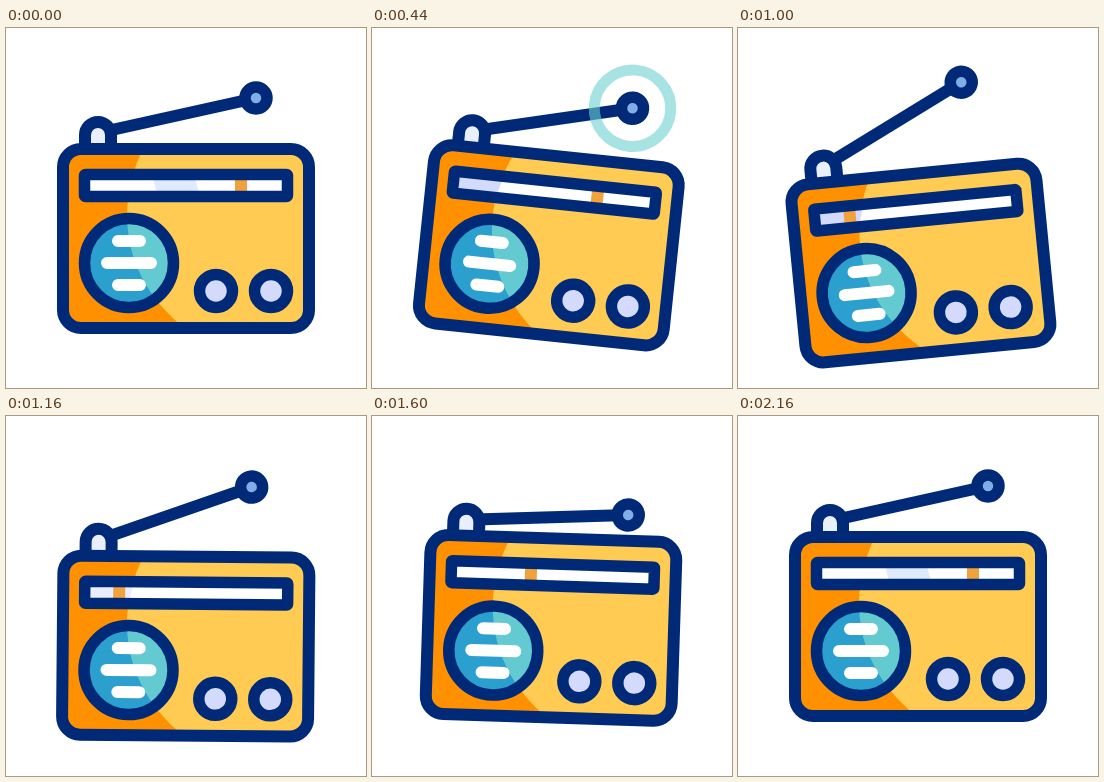
Write an HTML page that moves like this. It is 360 px wide and 360 px high and loops after 2.2 s.

```html
<!DOCTYPE html>
<html lang="en">
<head>
<meta charset="utf-8">
<title>Radio</title>
<style>
  html, body { margin: 0; width: 100%; height: 100%; overflow: hidden; background: #fff; }
  svg { display: block; width: 100%; height: 100%; }
  .line { fill: none; stroke: #002a78; stroke-width: 11.5; }
  .thick { stroke-width: 12; }
</style>
</head>
<body>
<svg viewBox="0 0 360 360">
  <defs>
    <path id="shade" d="M137 121C110 175 113 250 181 302H40V121Z"/>
    <clipPath id="caseClip"><rect x="57" y="121" width="246" height="179" rx="18"/></clipPath>
    <clipPath id="speakerClip"><circle cx="123" cy="235" r="44.5"/></clipPath>
  </defs>
  <g id="radio">
    <g id="antenna">
      <path class="line thick" d="M92 105L250 70"/>
      <circle class="line" cx="250" cy="70" r="11" style="fill:#82aee8"/>
      <circle id="wave" cx="250" cy="70" fill="none" stroke="#6fd0d2" stroke-width="11"/>
    </g>
    <path class="line thick" d="M79 121V107a13 13 0 0 1 26 0V121" style="fill:#e9effd"/>

    <g clip-path="url(#caseClip)">
      <rect x="57" y="121" width="246" height="179" fill="#ffcb52"/>
      <use href="#shade" fill="#ff9100"/>
    </g>
    <rect class="line thick" x="57" y="121" width="246" height="179" rx="18"/>

    <rect x="80" y="148" width="200" height="19" fill="#fff"/>
    <path id="dialShade" d="M84 150H127L123 165H84Z" fill="#d3dafb"/>
    <path id="dialGlow" d="M147 150H189L193 165H151Z" fill="#dfeafb"/>
    <rect id="needle" x="-6" y="151" width="12" height="13" fill="#f2a23a"/>
    <rect class="line" x="78.5" y="146.5" width="203" height="22" rx="1"/>

    <g clip-path="url(#speakerClip)">
      <rect x="70" y="180" width="110" height="110" fill="#64cad1"/>
      <use href="#shade" fill="#2b9fcd"/>
    </g>
    <circle class="line" cx="123" cy="235" r="44.5"/>
    <path id="grille" stroke="#fff" stroke-width="12" stroke-linecap="round"/>

    <circle class="line" cx="210" cy="263" r="16.5" style="fill:#d3dafb"/>
    <circle class="line" cx="265" cy="263" r="16.5" style="fill:#d3dafb"/>
  </g>
</svg>
<script>
  const LOOP = 2200;
  const set = (id, attrs) => {
    for (const key in attrs) document.getElementById(id).setAttribute(key, attrs[key]);
  };

  function draw(t) {
    // Eased step from 0 to 1, and a rise followed by a fall.
    const ease = (from, to) => {
      const u = Math.min(1, Math.max(0, (t - from) / (to - from)));
      return (1 - Math.cos(Math.PI * u)) / 2;
    };
    const bump = (from, top, leave, end) => ease(from, top) - ease(leave, end);

    const tilt = 6.2 * (bump(0, 500, 1360, 1740) - 2 * bump(500, 940, 940, 1360));
    const drop = 26 * bump(260, 780, 880, 1730);
    const swing = 9 * bump(880, 1600, 1640, 2100) - 15 * bump(320, 880, 880, 1600);
    const tune = 235 - 122 * bump(290, 1040, 1320, 1995);
    const bar = 22 - 5 * bump(340, 640, 640, 900);

    set('radio', { transform: `translate(0 ${drop}) rotate(${tilt} 180 180)` });
    set('antenna', { transform: `rotate(${swing} 92 105)` });
    set('needle', { transform: `translate(${tune} 0)` });
    set('grille', { d: `M112 213h22M${123 - bar} 235h${2 * bar}M112 257h22` });
    set('wave', { r: 10 + 30 * ease(120, 500), opacity: 0.6 * bump(120, 200, 440, 560) });
    set('dialShade', { opacity: bump(240, 400, 1000, 1320) });
    set('dialGlow', { opacity: 1 - bump(0, 300, 1760, 2000) });
  }

  const start = performance.now();
  function tick() {
    draw((performance.now() - start) % LOOP);
    requestAnimationFrame(tick);
  }
  tick();
</script>
</body>
</html>
```
